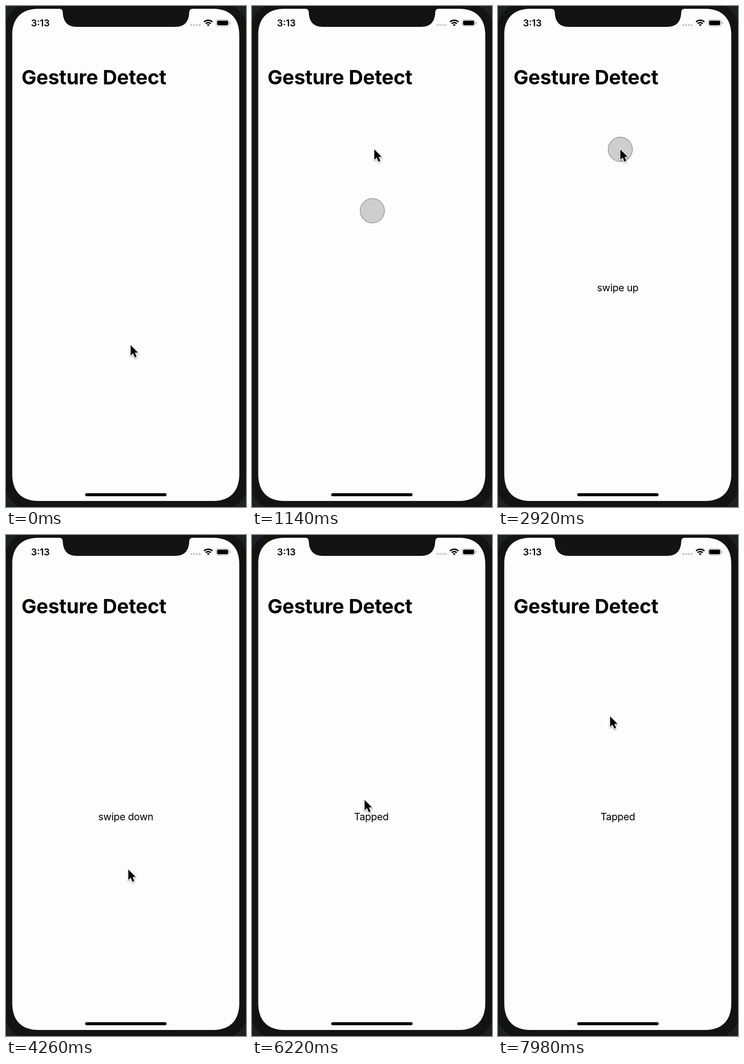
Write an HTML page that moves like this. It is 518x1080 px and loops after 8000 ms.

```html
<!DOCTYPE html>
<html lang="en">
<head>
<meta charset="utf-8">
<title>Gesture Detect</title>
<style>
  html, body { margin: 0; width: 100%; height: 100%; overflow: hidden; background: #1c2123; }
  svg { display: block; width: 100%; height: 100%; }
  text { font-family: Inter, "Liberation Sans", sans-serif; font-optical-sizing: none; fill: #000; }
  .clock { font-size: 20px; font-weight: 600; }
  .title { font-size: 43px; font-weight: 700; letter-spacing: -.2px; }
  .label { font-size: 21.5px; letter-spacing: -.3px; text-anchor: middle; }
</style>
</head>
<body>
<svg viewBox="0 0 518 1080">
  <rect x="-4" y="-8" width="526" height="1096" rx="62" fill="#131311"/>
  <path fill="#fdfdfc" d="M70 6 H115 Q122 6 122.500 13 C123 34 133 45 153 45 H365
    C385 45 395 34 395.500 13 Q396 6 403 6 H447 C484 6 503.500 27 503.500 62 V1009
    C503.500 1046 484 1067 447 1067 H70 C33 1067 13.500 1046 13.500 1009 V62 C13.500 27 33 6 70 6 Z"/>

  <text class="clock" x="54" y="43.500">3:13</text>
  <g fill="#c8c8ca">
    <rect x="398" y="39" width="4" height="4" rx="1"/>
    <rect x="404" y="39" width="4" height="4" rx="1"/>
    <rect x="410" y="39" width="4" height="4" rx="1"/>
    <rect x="416" y="39" width="4" height="4" rx="1"/>
  </g>
  <g fill="none" stroke="#000" stroke-width="3">
    <path d="M427.500 34.500 A12.700 12.700 0 0 1 445.500 34.500"/>
    <path d="M431 38 A7.800 7.800 0 0 1 442 38"/>
    <path d="M436.500 43.500 L433.500 40.500 A4.200 4.200 0 0 1 439.500 40.500 Z" fill="#000" stroke="none"/>
  </g>
  <rect x="453.500" y="29.500" width="28" height="14" rx="4" fill="none" stroke="#a4a4a4"/>
  <rect x="455.500" y="31.500" width="24" height="10" rx="2.400"/>
  <path d="M483 34 Q485 34.500 485 36.500 T483 39 Z" fill="#a4a4a4"/>

  <text class="title" x="33.500" y="169">Gesture Detect</text>
  <text class="label" id="label" y="614.500"></text>
  <rect x="171" y="1050.300" width="175.500" height="6.400" rx="3.200"/>

  <circle id="touch" r="26.300" fill="#000" fill-opacity=".19" stroke="#000" stroke-opacity=".36" stroke-width="1.400"/>
  <g id="cursor" style="filter: drop-shadow(0 2px 1.500px rgba(0,0,0,.32))">
    <path d="M0 0 V22.500 L5.200 17.800 L9 26.500 L13 24.800 L9.200 16.300 H16 Z"
      fill="#000" stroke="#fff" stroke-width="3" stroke-linejoin="round" paint-order="stroke"/>
  </g>
</svg>
<script>
const LOOP = 8000, LAG = 159;
const label = document.getElementById("label");
const touch = document.getElementById("touch");
const cursor = document.getElementById("cursor");

// Each move bows sideways by `bow` pixels at its midpoint.
const moves = [
  { start: 750, end: 1120, from: [269, 731], to: [264, 309], bow: -7 },
  { start: 3000, end: 3370, from: [264, 309], to: [264, 721], bow: -3 },
  { start: 4550, end: 5000, from: [264, 721], to: [243, 571], bow: 0 },
  { start: 7150, end: 7750, from: [243, 571], to: [242, 391], bow: 2 }
];
const presses = [[640, 1290], [2880, 3530], [5200, 5420]];
const messages = [
  [0, "", 259], [1300, "swipe up", 258.5], [3540, "swipe down", 258.5],
  [5430, "Tapped", 257.5], [6300, "Tapped", 258.5]
];

const clamp = u => Math.max(0, Math.min(1, u));
const ease = u => u * u * (3 - 2 * u);

function pointerAt(t) {
  const move = moves.filter(m => t >= m.start).pop() || moves[0];
  const u = ease(clamp((t - move.start) / (move.end - move.start)));
  const mix = i => move.from[i] + (move.to[i] - move.from[i]) * u;
  return [mix(0) + move.bow * Math.sin(Math.PI * u), mix(1)];
}

function render(t) {
  const place = (node, point) => node.setAttribute("transform", `translate(${point})`);
  place(cursor, pointerAt(t));
  place(touch, pointerAt(Math.max(0, t - LAG)));
  const pressed = presses.some(([down, up]) => t >= down && t < up);
  touch.setAttribute("visibility", pressed ? "visible" : "hidden");
  const [, message, x] = messages.filter(m => t >= m[0]).pop();
  label.textContent = message;
  label.setAttribute("x", x);
}

const origin = performance.now();
function tick() {
  render((performance.now() - origin) % LOOP);
  requestAnimationFrame(tick);
}
render(0);
requestAnimationFrame(tick);
</script>
</body>
</html>
```
